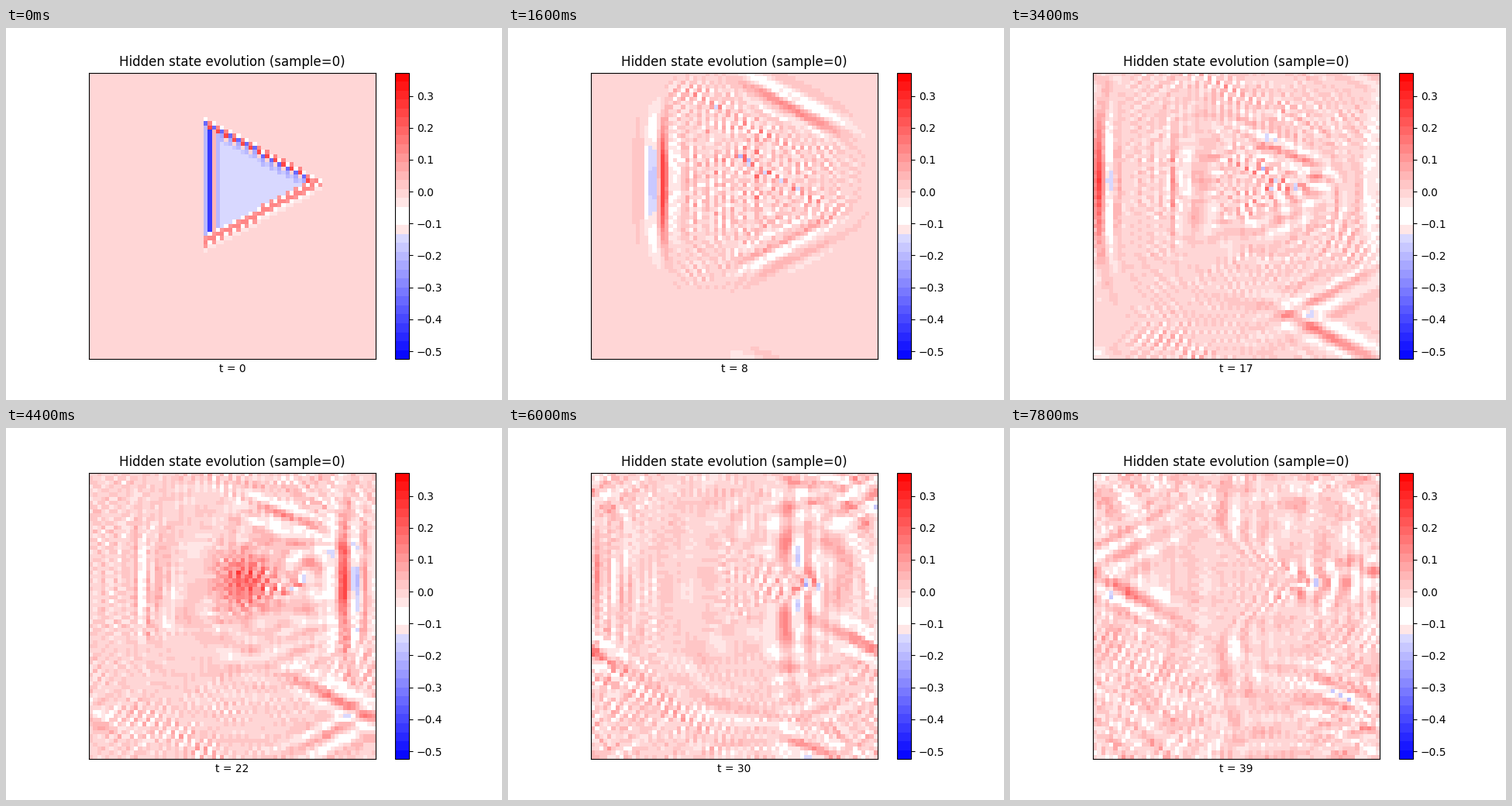
A matplotlib script that plays this animation: 640x480 px, repeating every 8000 ms.

```python
import numpy as np
import matplotlib.pyplot as plt
from matplotlib.animation import FuncAnimation
from matplotlib.colors import ListedColormap

N = 70               # grid cells per side
STEPS = 40
SUB = 3              # solver steps per shown step
CFL = 0.63
VMIN, VMAX = -0.5247, 0.3727

# Triangle: a vertical left side and two sloping ones meeting at the right
LEFT, RIGHT, SLOPE = 28, 56, 0.54
Y, X = np.mgrid[0:N, 0:N].astype(float)
TOP = 11.5 + SLOPE * (X - LEFT)
LOW = 41.5 - SLOPE * (X - LEFT)
DEPTH = np.minimum(X - LEFT - 1,
                   np.minimum(Y - TOP, LOW - Y) / np.hypot(1, SLOPE))


def band_map(n=32):
    """Blue-white-red in n flat bands with a white middle pair."""
    cols = plt.get_cmap("bwr")((np.arange(n) + 0.5) / n)
    mid = n // 2
    cols[mid - 1:mid + 1] = 1
    cols[mid - 2] = cols[mid + 1]
    return ListedColormap(cols)


def lap(u):
    return (np.roll(u, 1, 0) + np.roll(u, -1, 0)
            + np.roll(u, 1, 1) + np.roll(u, -1, 1) - 4 * u)


def first_state():
    """Filled triangle with an alternating edge response around it."""
    u = np.zeros((N, N))
    span = (X >= LEFT) & (X <= RIGHT)
    alt = np.where(X % 2 == 1, 1, -1)
    over = Y - np.floor(TOP)
    under = np.floor(LOW) - Y

    u[span & (over > 0) & (under > 0)] = -0.155
    top = 0.02 - 0.07 * over + 0.3 * alt * np.exp(-(over - 1) ** 2)
    low = 0.18 * np.exp(-under ** 2) - 0.04 - 0.08 * alt * (under % 2)
    for value, hit in ((top, (over >= 0) & (over <= 3) & (under >= 0)),
                       (low, (under >= -2) & (under <= 1) & (over >= 1))):
        u = np.where(span & hit, value, u)

    inner = (over >= 2) & (under >= 2)
    for i, value in enumerate((-0.2, -0.44, 0.05, -0.2)):
        u[inner & (X == LEFT + i)] = value
    return u


def pulse(mid, angle, amp, crest, centre, wave, width, shift):
    """Wave packet leaving one side of the triangle along its normal."""
    nx, ny = np.cos(angle), np.sin(angle)
    dx, dy = X - mid[0], Y - mid[1]
    s = dx * nx + dy * ny + shift
    along = dy * nx - dx * ny
    return (amp * np.exp(-((s - centre) / width) ** 2 - (along / 14) ** 4)
            * np.cos(2 * np.pi * (s - crest) / wave))


def packets(shift):
    tilt = np.radians(63)
    return (pulse((28.8, 26.2), np.pi, 0.26, -3.2, -1.4, 6.2, 3.2, shift)
            + pulse((42.3, 18.5), -tilt, 0.15, -3.2, -1.4, 6.2, 3.2, shift)
            + pulse((42.3, 33.7), tilt, -0.08, -4.5, -4.5, 5, 5, shift))


def blob(t):
    """Slow swelling at the middle of the triangle."""
    amp = sum(a * np.exp(-((t - peak) / 2) ** 2)
              for peak, a in ((22, 0.18), (26.5, -0.1), (34, 0.15)))
    return amp * np.exp(-((X - 37.7) ** 2 + (Y - 26) ** 2) / 48)


def plateau(t):
    """Inner part not yet reached by the waves from the sides."""
    return np.where(DEPTH > 1.8 * t, -0.15, 0.0)


def evolve():
    start = first_state()
    rng = np.random.default_rng(4)
    noise = 0.05 * (DEPTH > 2) * rng.standard_normal((N, N))
    ripple = noise - 0.17 * lap(start)
    u = packets(0) + ripple
    prev = packets(0.96 * CFL) + ripple
    inside = 1 / (1 + np.exp(-DEPTH / 0.8))
    states = [start]
    for t in range(1, STEPS):
        # The triangle turns into a slow, lossy region once the fronts left it
        slow = inside * np.clip((t - 6) / 6, 0, 1)
        c2 = CFL ** 2 * (1 - 0.92 * slow)
        for _ in range(SUB):
            u, prev = u + (1 - 0.03 * slow) * (u - prev) + c2 * lap(u), u
        states.append(u + blob(t) + plateau(t))
    return states


states = evolve()

fig, ax = plt.subplots(figsize=(6.4, 4.8), dpi=100)
im = ax.imshow(states[0], cmap=band_map(), vmin=VMIN, vmax=VMAX,
               interpolation="nearest")
fig.colorbar(im, ax=ax)
ax.set_xticks([])
ax.set_yticks([])
ax.set_title("Hidden state evolution (sample=0)")
label = ax.set_xlabel("t = 0")


def draw(t):
    im.set_data(states[t])
    label.set_text(f"t = {t}")
    return im, label


anim = FuncAnimation(fig, draw, frames=STEPS, interval=1000 // 5,
                     repeat=True, repeat_delay=0, blit=False)
plt.show()
```
